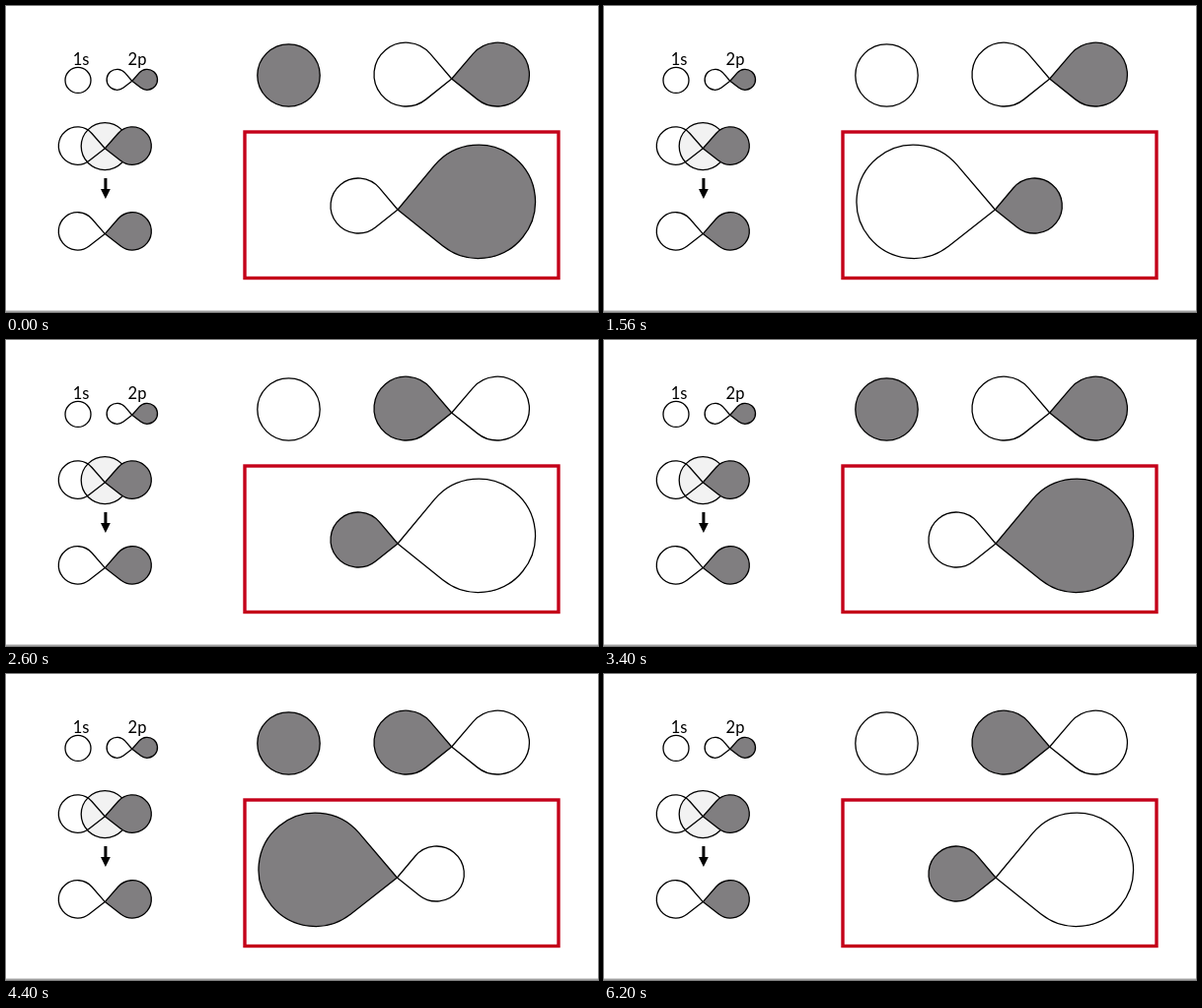
Recreate the animation shown at these times as an HTML page. Size 600 px wide and 311 px high, loop 7.08 s.

```html
<!DOCTYPE html>
<html lang="en">
<head>
<meta charset="utf-8">
<title>Mixing of 1s and 2p orbitals</title>
<style>
html, body { margin: 0; height: 100%; overflow: hidden; background: #fff; }
svg { display: block; }
.shape { stroke: #000; stroke-width: 1.3; stroke-linejoin: round; }
text { font: 16.5px Lato, Carlito, sans-serif; text-anchor: middle; }
</style>
</head>
<body>
<svg id="stage" width="600" height="311" viewBox="0 0 600 311">
  <text x="76" y="60">1s</text>
  <text x="133" y="60">2p</text>
  <path d="M99.4 175h3v11h3.4l-4.9 10l-4.9-10h3.4z"/>
  <rect x="242" y="128" width="318" height="148.5" fill="none" stroke="#c40019" stroke-width="3.4"/>
  <path d="M0 310.2H600" stroke="#777"/>
</svg>
<script>
const stage = document.getElementById('stage');
const GREY = '#807e80', WHITE = '#fff';

function add(tag, attrs) {
  const el = document.createElementNS('http://www.w3.org/2000/svg', tag);
  for (const k in attrs) el.setAttribute(k, attrs[k]);
  el.setAttribute('class', 'shape');
  return stage.appendChild(el);
}

const circle = (cx, cy, r, fill = WHITE) => add('circle', { cx, cy, r, fill });

// Teardrop: a circle joined to its apex by the two tangent lines.
function lobe(ax, ay, cx, cy, r, fill = WHITE) {
  const dx = cx - ax, dy = cy - ay, d = Math.hypot(dx, dy);
  const axis = Math.atan2(dy, dx), half = Math.asin(r / d);
  const len = Math.sqrt(d * d - r * r);
  const touch = a => `${ax + len * Math.cos(a)} ${ay + len * Math.sin(a)}`;
  return add('path', {
    d: `M${ax} ${ay}L${touch(axis - half)}A${r} ${r} 0 1 1 ${touch(axis + half)}Z`, fill
  });
}

// Two mirrored lobes sharing one apex.
function pair(ax, ay, dx, dy, r, left = WHITE) {
  return [lobe(ax, ay, ax - dx, ay - dy, r, left), lobe(ax, ay, ax + dx, ay - dy, r, GREY)];
}

circle(73, 75.4, 13);
pair(127.8, 76.3, 15.2, 1.5, 10.5);
circle(100.2, 142.6, 24, '#f2f2f2');
pair(100.3, 144.8, 27.8, 2.7, 19.2, 'none');
pair(100.3, 231.6, 27.8, 2.7, 19.2);

const s = circle(286.5, 70.5, 31.7);
const [pLeft, pRight] = pair(451.7, 74, 46.3, 4.4, 32.4);
const bigLeft = lobe(396.4, 207, 313.7, 198.8, 57.7);
const smallRight = lobe(396.4, 207, 436.3, 203, 28);
const smallLeft = lobe(397, 207, 357, 203, 28);
const bigRight = lobe(397, 207, 478.8, 198.8, 57.7);

const LOOP = 7080;
const switches = [520, 1560, 2480, 3400, 4160, 5200, 6120];
const tint = (el, grey) => el.setAttribute('fill', grey ? GREY : WHITE);
const show = (el, on) => el.setAttribute('visibility', on ? 'visible' : 'hidden');

function draw(now) {
  const t = now % LOOP;
  const phase = switches.filter(at => t >= at).length % 4;
  const sGrey = phase < 2, leftGrey = phase % 2 === 1;
  const bulgesLeft = sGrey === leftGrey;   // like phases add up on that side
  tint(s, sGrey);
  for (const el of [pLeft, bigLeft, smallLeft]) tint(el, leftGrey);
  for (const el of [pRight, bigRight, smallRight]) tint(el, !leftGrey);
  for (const el of [bigLeft, smallRight]) show(el, bulgesLeft);
  for (const el of [smallLeft, bigRight]) show(el, !bulgesLeft);
}

const start = performance.now();
function tick() {
  draw(performance.now() - start);
  requestAnimationFrame(tick);
}
tick();
</script>
</body>
</html>
```
